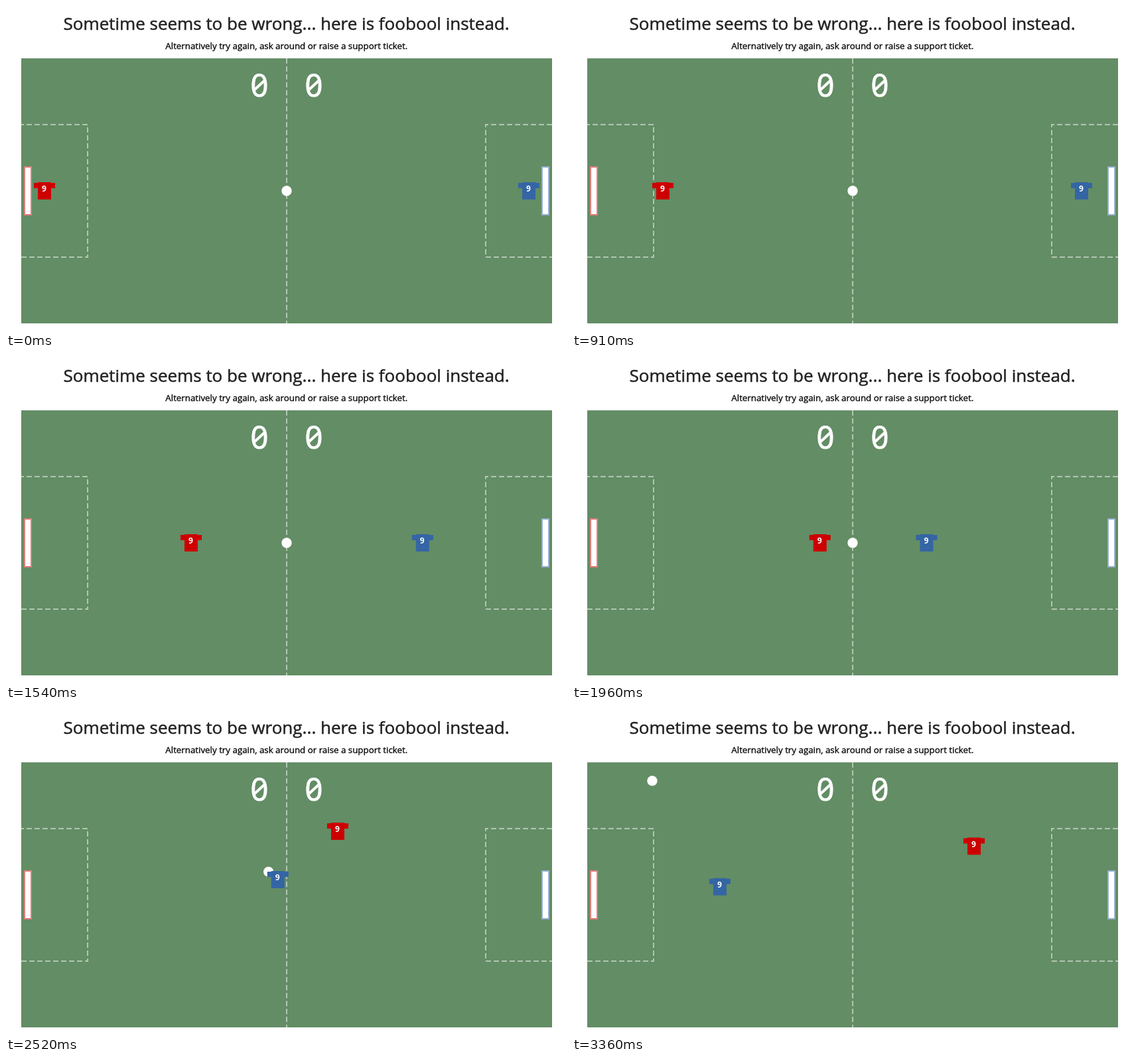
An HTML page that plays this animation: 844 by 489 pixels, repeating every 3430 ms.

```html
<!DOCTYPE html>
<html lang="en">
<head>
<meta charset="utf-8">
<title>Table match</title>
<style>
  html, body { margin: 0; width: 100%; height: 100%; overflow: hidden; background: #fff; }
  svg { display: block; }
  text { text-anchor: middle; font-family: "Open Sans", "Noto Sans", sans-serif; }
  .title { font-size: 26px; fill: #222; stroke: #222; stroke-width: .5; }
  .hint { font-size: 13.333px; stroke: #000; stroke-width: .3; }
  .score { font-size: 47px; fill: #fff; stroke: #fff; }
  .slash { stroke: #fff; stroke-width: 4; }
  .number { font-size: 12px; font-weight: bold; fill: #fff; }
  .lines { fill: none; stroke: #fff; stroke-opacity: .5; stroke-width: 2; stroke-dasharray: 8 4; }
  .goal { stroke-width: 2; stroke-opacity: .5; }
  .red { fill: #c00; stroke: #c00; }
  .blue { fill: #3465a4; stroke: #3465a4; }
  .shirt { stroke: none; }
</style>
</head>
<body>
<svg width="844" height="489" viewBox="0 0 844 489">
  <defs>
    <g id="shirt">
      <path d="M6 0H26V1H32V9H26V26H6V9H0V1H6Z"/>
      <text class="number" x="15.5" y="14">9</text>
    </g>
    <g id="goal">
      <rect width="12" height="74" fill="#fff" stroke="none"/>
      <rect class="goal" x="1" y="1" width="10" height="72" fill="none"/>
    </g>
    <g id="zero">
      <text class="score" y="136.5">0</text>
      <path class="slash" d="M-7 126L7 113"/>
    </g>
  </defs>
  <text class="title" x="422.6" y="36">Sometime seems to be wrong... here is foobool instead.</text>
  <text class="hint" x="422.8" y="65">Alternatively try again, ask around or raise a support ticket.</text>
  <rect x="23" y="79" width="800" height="400" fill="#638d65"/>
  <path class="lines" d="M423 79V479M23 379H123V179H23M823 179H723V379H823"/>
  <use class="red" href="#goal" x="27" y="242"/>
  <use class="blue" href="#goal" x="807" y="242"/>
  <use href="#zero" x="382"/>
  <use href="#zero" x="464"/>
  <circle id="ball" r="7.7" fill="#fff"/>
  <use id="red" class="red shirt" href="#shirt"/>
  <use id="blue" class="blue shirt" href="#shirt"/>
</svg>
<script>
const LOOP = 3430, STEP = 70;
const RISE = .243;            // vertical running speed, px per ms
const KICK = 2450, WALL = 86; // time of the kick, ball height at the bounce

// Time for which a key pressed between two moments has been held.
const held = (t, from, to) => Math.max(0, Math.min(t, to) - from);

const place = {
  red: t => [
    42 + .2255 * held(t, 560, 2990),
    266 - RISE * (held(t, 2125, 2567) - held(t, 3220, LOOP))
  ],
  blue: t => [
    772 - .2225 * held(t, 820, LOOP),
    266 - RISE * (held(t, 2405, 2500) - held(t, 3300, 3345))
  ],
  ball: t => t < KICK ? [423, 279] : [
    418.5 - .327 * (t - KICK),
    WALL + Math.abs(173 - .213 * (t - KICK))
  ]
};

const start = performance.now();

function draw() {
  const elapsed = (performance.now() - start) % LOOP;
  const t = Math.floor(elapsed / STEP) * STEP;
  for (const id in place) {
    document.getElementById(id).setAttribute("transform", `translate(${place[id](t)})`);
  }
  requestAnimationFrame(draw);
}
draw();
</script>
</body>
</html>
```
